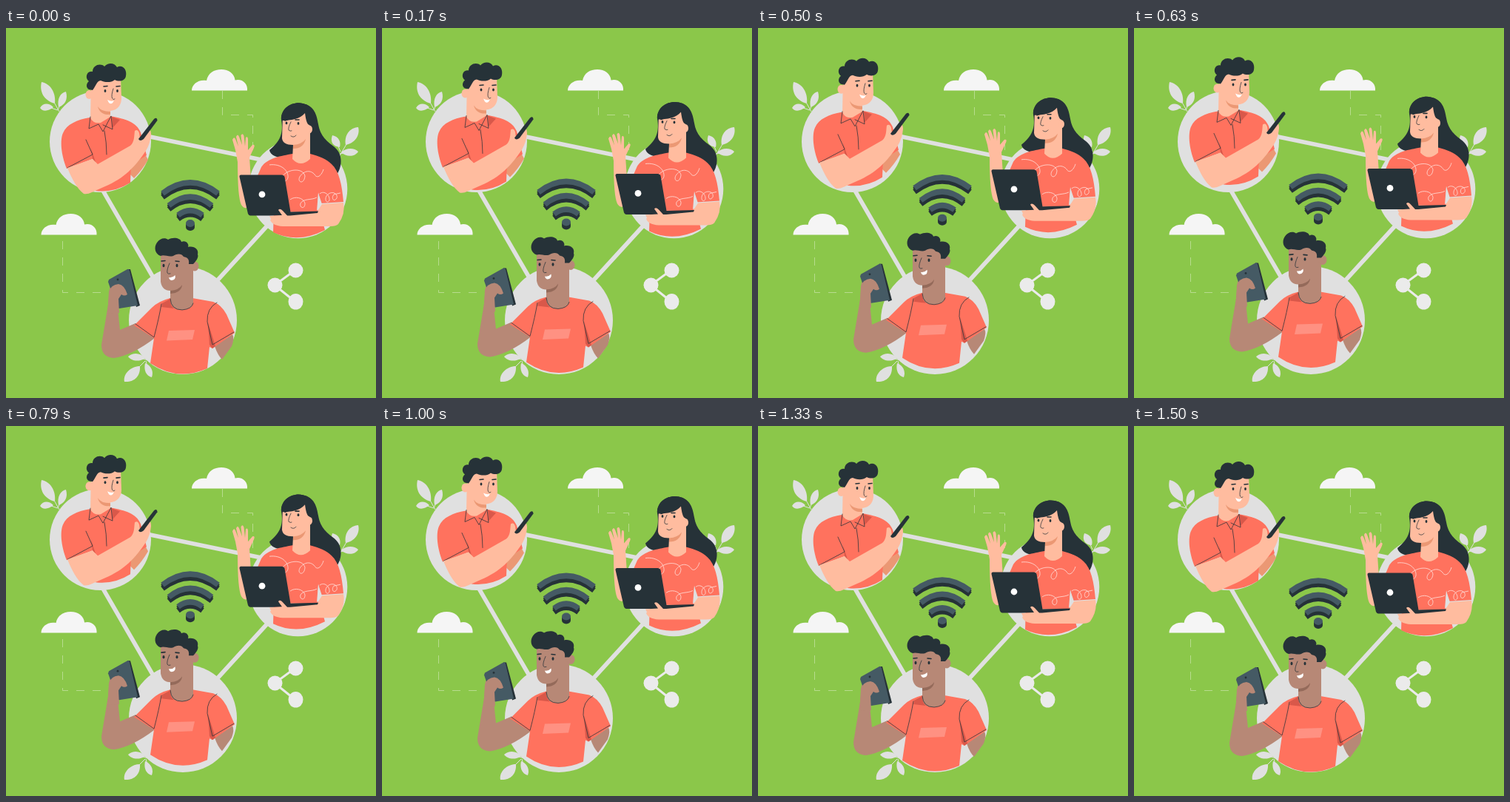
An HTML page for the animation above (1.54 s loop, 500 by 500 pixels).

```html
<!DOCTYPE html>
<html lang="en">
<head>
<meta charset="utf-8">
<title>Connected people</title>
<style>
  html, body { margin: 0; height: 100%; overflow: hidden; background: #8bc74a; }
  svg { display: block; width: 100vw; height: 100vh; }
  .disc { fill: #e0e0e0; }
  .link { stroke: #e0e0e0; stroke-width: 5.600; }
  .cloud { fill: #f5f5f5; }
  .pale { fill: #ebebeb; }
  .leaf { fill: #e0e0e0; }
  .stem { stroke: #e0e0e0; stroke-width: 1; fill: none; }
  .dash { stroke: #c3e1a0; stroke-width: .8; fill: none; stroke-dasharray: 11 11; }
  .dark { fill: #263238; }
  .slate { fill: #455a64; }
  .red { fill: #ff725e; }
  .deep { fill: #d9584a; }
  .skin { fill: #ffbc9f; }
  .shade { fill: #eb9874; }
  .brown { fill: #b78876; }
  .umber { fill: #946a5a; }
  .white { fill: #fff; }
  .ink { fill: none; stroke: #263238; stroke-width: .75; stroke-linecap: round; }
  .brow { fill: none; stroke: #263238; stroke-width: 1.600; stroke-linecap: round; }
  .curl { fill: none; stroke: #ffe3dd; stroke-width: .8; }
  .arc { fill: none; stroke: currentColor; stroke-width: 7.500; }
</style>
</head>
<body>
<svg viewBox="0 0 500 500">
  <defs>
    <path id="cloud" class="cloud" d="M251 84.500C251 76 260 69 271 71C273 61 281 56 291 56C301 56 309 62 309.500 70.500C319 68 327 75 326 84.500Z"/>
    <g id="wifi">
      <path class="arc" d="M211.500 223.500Q249 194.500 286.500 223.500M220 240Q249 216.500 278 240M232.500 253Q249 240.500 265.500 253"/>
      <ellipse cx="249" cy="264" rx="6" ry="5" fill="currentColor"/>
    </g>
  </defs>

  <!-- Static scenery -->
  <path class="link" d="M190 146L345 178M130 218L200 339M282 345L356 264"/>
  <circle class="disc" cx="127.500" cy="153.500" r="68.500"/>
  <circle class="disc" cx="394.500" cy="217.500" r="66.800"/>
  <circle class="disc" cx="239" cy="395" r="73"/>
  <path class="dash" d="M292.500 85V117.500H333.500V172M76.500 288V357.500H135"/>
  <use href="#cloud"/>
  <use href="#cloud" x="-203.500" y="195"/>
  <g class="pale">
    <path d="M391 327L363 347.500L391 370" fill="none" stroke="#ebebeb" stroke-width="3"/>
    <circle cx="391.500" cy="327.500" r="10"/>
    <circle cx="363.500" cy="347.500" r="10"/>
    <ellipse cx="391.500" cy="369.800" rx="10" ry="10.800"/>
  </g>
  <g class="leaf">
    <path d="M66 102C51 98 45 86 48 73C60 75 68 88 66 102ZM71 107C69 96 73 88 81 86C84 96 80 104 71 107ZM64 107C57 113 49 113 46 108C50 101 58 101 64 107Z"/>
    <path d="M459 158C457 145 464 135 476 134C479 145 471 156 459 158ZM451 161C441 160 438 153 441 145C450 147 453 154 451 161ZM453 168C460 161 471 162 476 167C471 175 459 174 453 168Z"/>
    <path d="M188 446C180 452 169 450 165 444C172 438 182 439 188 446ZM181 457C182 471 173 479 160 478C158 467 169 457 181 457ZM188 453C196 456 200 464 197 472C189 470 186 462 188 453Z"/>
  </g>
  <path class="stem" d="M62 95L72 113M75 98L70 111M58 107L70 111M466 147L450 174M446 153L452 167M463 168L451 170M178 445L196 450M172 466L188 450M192 462L189 450"/>

  <!-- Floating parts -->
  <g id="float">
    <use href="#wifi" y="5" color="#263238"/>
    <use href="#wifi" y="2.500" color="#263238"/>
    <use href="#wifi" color="#455a64"/>

    <!-- Man with a phone, upper left -->
    <path class="shade" d="M184 163L192 178Q184 192 173 203L166 196L171 183Z"/>
    <path class="red" d="M113 121C96 124 82 130 77 142C73 151 74 170 82 190L117 177L121 220Q146 223 168 209L169 185L190 172L182 141C176 127 162 123 141 119Q127 131 113 121Z"/>
    <path class="deep" d="M143 120L154 124L144 135ZM115 163L117 177L122 184Z"/>
    <path class="skin" d="M115 70L114 122Q119 130 128 128L141 120L141 112C151 111 156 104 156 95L155 66L130 60Z"/>
    <path class="shade" d="M141 113Q128 113 124 106Q127 118 141 117Z"/>
    <ellipse class="skin" cx="112.500" cy="90" rx="5" ry="6"/>
    <path class="dark" d="M112 83C108 81 108 75 112 72C106 68 109 57 117 59C117 50 128 47 133 52C138 46 147 47 150 53C157 49 164 56 162 65C161 72 152 73 147 70C141 75 132 73 128 71C122 72 122 78 117 84Z"/>
    <path class="brow" d="M132 79L137 78.500M149 79L154 78.500"/>
    <g class="dark"><ellipse cx="134" cy="85" rx="1.400" ry="2"/><ellipse cx="150.500" cy="85" rx="1.400" ry="2"/></g>
    <path class="ink" d="M145 82Q142 91 143.500 95Q145 98 147 96"/>
    <path class="white" d="M137 97Q142 100 146 98Q143 104.500 139 101Z"/>
    <path class="red" d="M114 120L111 136L126 131Q115 128 114 120ZM142 119L144 137L131 131Z"/>
    <path class="ink" d="M114 120L112 136L125 130L131 140L142 119L144 137L131 131M133 139Q136 155 136 171M108 151L117 171L83 189"/>
    <path class="skin" d="M83 189L117 177L124 184L168 159C174 154 173 145 174 139Q178 136 180 142L181 149L189 142Q196 133 196 144Q195 156 189 166C174 188 160 203 134 214L116 222Q110 225 105 224C96 217 89 204 83 189Z"/>
    <path class="dark" d="M200 123Q204 120 204.500 125L186 150Q181 154 179 150Z"/>

    <!-- Woman with a laptop -->
    <path class="dark" d="M372 124C371 108 387 99 401 102C417 105 420 118 422 130C425 147 434 153 444 161C457 172 453 190 447 198C432 190 416 184 405 182L384 176C370 177 357 173 356 165C371 153 375 142 372 124Z"/>
    <path class="skin" d="M313 181L310 165L306 151Q308 146 310 150L314 160L311 147Q313 142 315 147L319 158L317.500 145Q320 141 321.500 146L323 160L324 148Q327 146 327 151L327 165L333 158Q337 157 335 162L329 175L331 205L331 240Q323 247 318 239Q313 229 313 181Z"/>
    <path class="red" d="M387 170C372 173 354 175 345 188L338 204L362 246L361 276Q394 292 431 273L428 262L421 245L422 222L425 237L456 235C454 211 450 193 440 184C433 177 423 173 411 170Z"/>
    <path class="skin" d="M374 119L373 149Q374 158 388 158L387 177Q398 189 411 177V141Q415 137 412 132L409 110L390 108Z"/>
    <path class="shade" d="M388 158Q400 157 405 150Q402 163 388 163Z"/>
    <path class="dark" d="M372 125C371 108 387 99 401 102C416 105 420 118 421 133L412 143L410 131Q406 131 404 115C397 123 386 125 372 125Z"/>
    <ellipse class="skin" cx="410" cy="137" rx="4" ry="5.500"/>
    <path class="brow" d="M377 125L381 123.500M391 124L396 124"/>
    <g class="dark"><ellipse cx="379" cy="128.500" rx="1.400" ry="1.900"/><ellipse cx="395" cy="129" rx="1.400" ry="1.900"/></g>
    <path class="ink" d="M385 127Q381 135 382 138Q384 140 386 139M385 146Q389 149 392 145"/>
    <g class="curl">
      <path d="M356 185C372 183 382 193 381 202C379 210 371 207 374 200C380 191 401 188 404 200C403 212 393 209 397 201C403 192 412 192 417 198C421 205 427 198 429 191"/>
      <path d="M384 232C390 227 402 229 404 237C404 246 396 243 398 237C402 230 413 233 420 229M424 224C430 219 438 226 437 233C434 238 430 233 433 227C439 219 449 223 447 230C443 236 439 230 443 225L452 223"/>
    </g>
    <path class="disc" d="M422 223L427 238L420 247Z"/>
    <path class="skin" d="M427 238L456 236Q459 251 449 265Q446 268 438 268L374 268Q359 267 357 259L370 253L368 245Q372 243 376 248L420 249Z"/>
    <path class="dark" d="M317 198.500L373 198.500Q376 199 376.500 201L384.500 248.500L422 247.500L421 250L384 253.500H330Q328 253 327 251L315.500 201Q315 199 317 198.500Z"/>
    <path class="skin" d="M356 254L373 253L368 246Q370 243 374 247L380 253.500V261L360 262Z"/>
    <circle class="white" cx="346" cy="225" r="4.400"/>

    <!-- Man holding up a tablet -->
    <path class="brown" d="M282 430L306 414Q309 419 305 430L292 448Q286 442 282 430Z"/>
    <path class="brown" d="M175 399L201 419Q171 442 146 446Q129 445 129 428L138 374L140 351L160 349L151 379L154 408Z"/>
    <path class="red" d="M222 365Q206 369 197 378L173 402L200 419L195 453Q232 478 272 460L275 431L279 433L309 412L298 387Q291 374 280 370L252 365Z"/>
    <path class="deep" d="M211 372L222 366Q222 375 227 379L210 377ZM273 398L283 430L279 433L275 428Z"/>
    <path fill="#ff9182" d="M220 409L255 408L252 421L217 422.500Z"/>
    <path class="brown" d="M209 300L209 343Q211 355 222 355V368Q223 381 238 381Q251 380 253 372V315L245 296Z"/>
    <path class="umber" d="M222 355Q234 354 238 347Q237 358 222 359Z"/>
    <ellipse class="brown" cx="255" cy="322" rx="5.500" ry="6.500"/>
    <path class="dark" d="M209 308C202 306 199 297 204 290C208 284 215 283 219 286C226 282 236 284 237 289C243 286 248 292 246 296C254 294 261 299 259 306C261 310 256 316 253 319L247 319C248 312 245 310 240 309C237 304 230 305 226 308C220 310 214 306 209 308Z"/>
    <path class="brow" d="M210 315L215 314.500M229 315L234 315.500"/>
    <g class="dark"><ellipse cx="213" cy="321" rx="1.500" ry="2.200"/><ellipse cx="231" cy="321" rx="1.500" ry="2.200"/></g>
    <path class="ink" d="M221 318Q217 327 218 331Q219 333 222 332"/>
    <path class="white" d="M220 337Q225 338 228.500 334Q230 340 224 341Q221 341 220 337Z"/>
    <path class="ink" d="M222 366Q223 381 238 381Q251 380 253 372M210 373Q207 391 200 418L175 400M285 371Q271 379 272 397L279 428L308 411"/>
    <path class="dark" d="M164 326L168 326L181 375L176 377Z"/>
    <path class="slate" d="M139 340L164 326Q166 325 167 328L178 375L153 379L150 378L138 343Z"/>
    <circle class="dark" cx="151" cy="340" r="1.400"/>
    <path class="brown" d="M138 374L139 356Q142 347 152 346Q160 347 164 360Q160 363 156 360L152 366L153 385L137 386Z"/>
  </g>
</svg>
<script>
  const LOOP = 1540, STEPS = 37, LIFT = 9;
  const float = document.getElementById('float');

  function draw() {
    const time = performance.now() % LOOP;
    const step = Math.floor(time / LOOP * STEPS + 0.1);
    const angle = (step + 1) / STEPS * 2 * Math.PI;
    const lift = LIFT * (1 - Math.cos(angle)) / 2;
    float.setAttribute('transform', `translate(0 ${-lift.toFixed(2)})`);
    requestAnimationFrame(draw);
  }
  draw();
</script>
</body>
</html>
```
